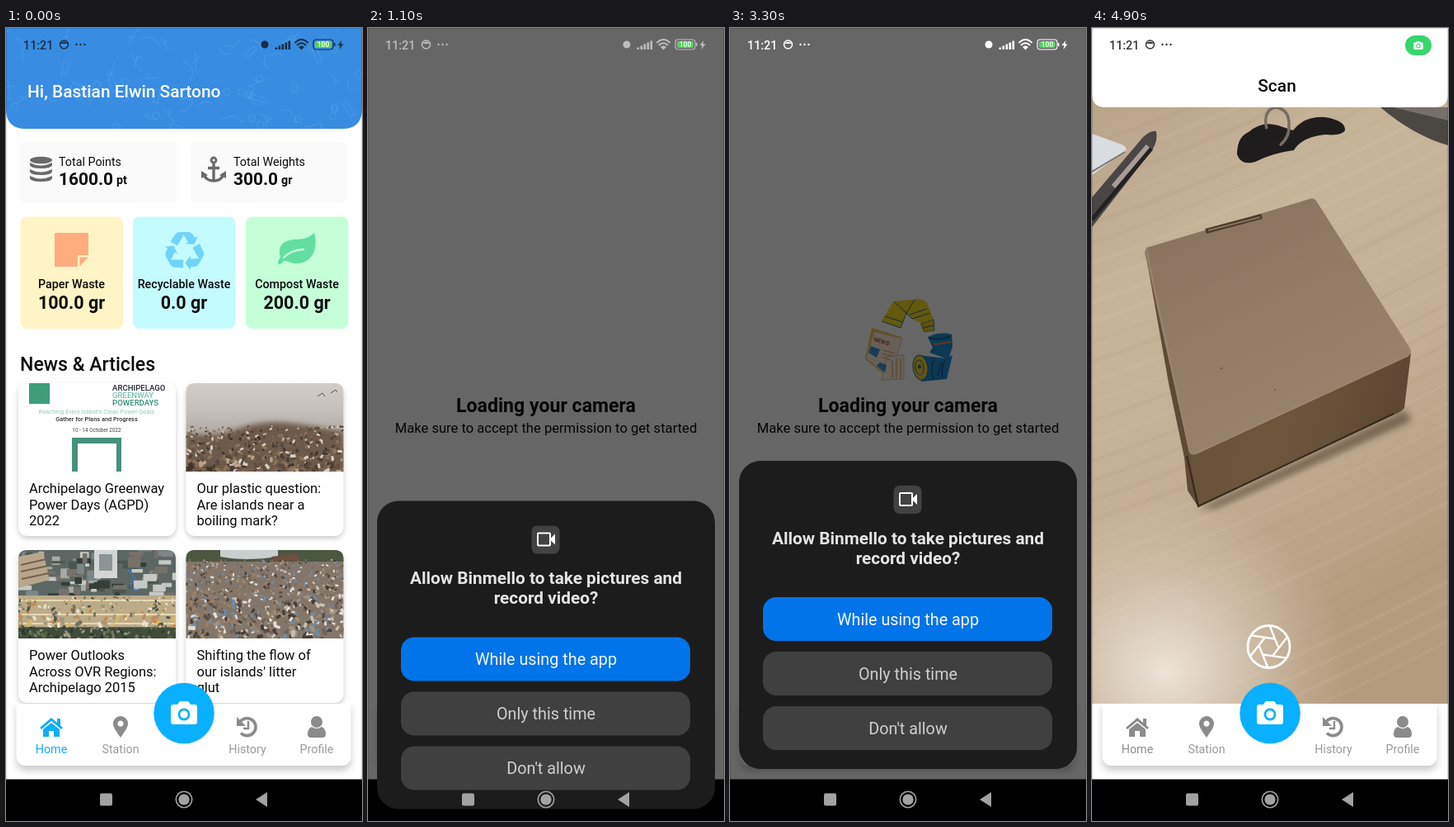
Write an HTML page that moves like this. It is 432 by 960 pixels and loops after 5000 ms.

```html
<!DOCTYPE html>
<html lang="en">
<head>
<meta charset="utf-8">
<title>Waste app</title>
<style>
html, body { margin: 0; width: 100%; height: 100%; overflow: hidden; background: #fff; }
svg { display: block; width: 432px; height: 960px; font-family: Roboto, sans-serif; }
.b { font-weight: 700; }
.m { font-weight: 500; }
.c { text-anchor: middle; }
.card { fill: #fff; filter: drop-shadow(0 3px 3px rgba(0,0,0,.2)); }
</style>
</head>
<body>
<svg id="stage" viewBox="0 0 432 960"></svg>
<script>
const LOOP = 5000, STEP = 100;

let seed = 7;
const rnd = () => (seed = (seed * 16807) % 2147483647) / 2147483647;
const pick = list => list[Math.floor(rnd() * list.length)];
const clamp = v => Math.max(0, Math.min(1, v));
const ramp = (t, a, b) => clamp((t - a) / (b - a));

const text = (x, y, size, str, cls = '', fill = '#0b0b0b') =>
  `<text x="${x}" y="${y}" font-size="${size}" class="${cls}" fill="${fill}">${str}</text>`;
const rect = (x, y, w, h, fill, r = 0, more = '') =>
  `<rect x="${x}" y="${y}" width="${w}" height="${h}" rx="${r}" fill="${fill}" ${more}/>`;
const path = (d, fill, more = '') => `<path d="${d}" fill="${fill}" ${more}/>`;
const line = (d, stroke, w = 1, more = '') =>
  `<path d="${d}" fill="none" stroke="${stroke}" stroke-width="${w}" ${more}/>`;
const circle = (x, y, r, fill, more = '') =>
  `<circle cx="${x}" cy="${y}" r="${r}" fill="${fill}" ${more}/>`;
const group = (id, body, more = '') => `<g id="${id}" ${more}>${body}</g>`;
const lines = (x, y, step, size, list) => list.map((s, i) => text(x, y + i * step, size, s)).join('');

// Scattered tilted chips, smaller towards the top
function litter(x, y, w, h, n, colors) {
  let out = '';
  for (let i = 0; i < n; i++) {
    const k = rnd(), px = x + rnd() * w, py = y + k * h, s = 1 + k * 3 * rnd() + rnd();
    out += rect((-s).toFixed(1), (-s / 2).toFixed(1), (s * 2).toFixed(1), (s * 1.1).toFixed(1), pick(colors), .8,
      `transform="translate(${px.toFixed(1)} ${py.toFixed(1)}) rotate(${Math.floor(rnd() * 180)})"`);
  }
  return out;
}

function doodles() {
  let out = '';
  for (let i = 0; i < 75; i++) {
    const x = rnd() * 432, y = rnd() * 122, a = rnd() * 360, s = 5 + rnd() * 8;
    const shape = pick([`M${-s} 0Q0 ${-s} ${s} 0`, `M${-s} -3H${s}V3H${-s}Z`,
      `M${-s} 0H${s}M0 0L${s / 2} 5`, `M0 ${-s / 2}a4 4 0 1 1 -1 0Z`]);
    out += line(shape, '#5fa8f0', 1.6, `opacity=".3" stroke-linecap="round" transform="translate(${x.toFixed(1)} ${y.toFixed(1)}) rotate(${a.toFixed(0)})"`);
  }
  return out;
}

const cameraGlyph = (x, y, k, bg, fill = '#fff') =>
  `<g transform="translate(${x} ${y}) scale(${k})">` +
  path('M-13-10H-8L-6-13Q-5.5-14 -4-14H4Q5.5-14 6-13L8-10H13Q16-10 16-7V11Q16 14 13 14H-13Q-16 14-16 11V-7Q-16-10-13-10Z', fill) +
  circle(0, 2, 7.4, bg) + circle(0, 2, 4.7, fill) + '</g>';

const recycleArm = 'M-17-11.5L-10-21.5Q-9-23-6-23H5Q8-23 10-20.5L13-16L16.5-18L12-8L1-9L4.5-11L-1-19.5L-8.5-6.5Z';
const recycle = (x, y, fill) => [0, 120, 240].map(a =>
  path(recycleArm, fill, `transform="translate(${x} ${y}) rotate(${a})"`)).join('');

function stats() {
  const ink = '#6a6a6a';
  let out = rect(17, 139, 190, 72, '#fafafa', 4) + rect(224, 139, 190, 72, '#fafafa', 4);
  for (let i = 0; i < 3; i++) {
    const y = 163 + i * 8;
    out += path(`M29 ${y}Q42 ${y + 7} 56 ${y}V${y + 3}Q55 ${y + 7} 42.5 ${y + 7}T29 ${y + 3}Z`, ink);
  }
  out += `<ellipse cx="42.5" cy="160" rx="13.5" ry="4.2" fill="${ink}"/>`;
  out += circle(252, 160, 3, 'none', `stroke="${ink}" stroke-width="2.8"`) +
    line('M252 163V185M245 169.500H259M240 177C242 183 246 185 252 185S262 183 264 177', ink, 3.4) +
    path('M237 182V173L245 178ZM267 182V173L259 178Z', ink);
  out += text(64, 167, 14.3, 'Total Points') + text(64, 190, 20.9, '1600.0', 'b') + text(134, 189, 14.3, 'pt', 'b');
  out += text(276, 167, 14.3, 'Total Weights') + text(276, 190, 20.9, '300.0', 'b') + text(334, 189, 14.3, 'gr', 'b');
  return out;
}

function wastes() {
  const tile = (x, fill, name, value) => rect(x, 228.500, 124.5, 135.500, fill, 8) +
    text(x + 62, 315, 14.3, name, 'm c') + text(x + 62, 340, 21.5, value, 'b c');
  return tile(17.5, '#fff4c5', 'Paper Waste', '100.0 gr') +
    tile(154, '#c4fbff', 'Recyclable Waste', '0.0 gr') +
    tile(291, '#c5ffd8', 'Compost Waste', '200.0 gr') +
    path('M60 248H99Q100 248 100 249V275H89Q87 275 87 277V289H60Q59 289 59 288V249Q59 248 60 248Z', '#ffad7e') +
    path('M89.500 277.500H100L89.500 288.500Z', '#ffad7e') +
    recycle(216.500, 270, '#70d4fa') +
    path('M374 248C379 266 373 284 354 285C346 286 341 281 337 282C335 284 333 287 331 286C328 284 332 280 333 277C328 262 340 256 352 256C362 256 369 253 374 248Z', '#62dea0') +
    line('M337 278C344 271 350 269 361 268', '#c5ffd8', 2.4, 'stroke-linecap="round"');
}

const clip = (id, x, y) => `<clipPath id="${id}"><path d="M${x} ${y + 107}V${y + 11}q0-11 11-11h169q11 0 11 11v96Z"/></clipPath>`;

function poster() {
  return rect(15, 430, 191, 107, '#fff') + rect(28, 430, 25, 25, '#3f9d7c') +
    text(129, 439, 9.6, 'ARCHIPELAGO', 'm', '#223') + text(129, 448, 9.6, 'GREENWAY', '', '#4bb497') +
    text(129, 457, 9.6, 'POWERDAYS', 'm', '#2f8f74') +
    text(110, 467, 7.4, "Reaching Every Island's Clean Power Goals", 'c', '#8fcbb8') +
    text(110, 476, 7.4, 'Gather for Plans and Progress', 'm c', '#333') +
    text(110, 489, 6.4, '10 - 14 October 2022', 'c', '#444') +
    rect(80, 496, 60, 42, '#46917c') + rect(87, 503, 47, 34, '#fff');
}

function bay() {
  return rect(218, 430, 192, 107, 'url(#water)') +
    path('M218 491Q250 497 280 486T340 478T410 489V537H218Z', '#6d5a4a', 'style="filter:blur(3px)"') +
    litter(218, 482, 192, 56, 420, ['#4e4035', '#7d6550', '#b9a48a', '#3d332c', '#d6cdbf', '#6a503f', '#8f7258', '#594a3e']) +
    path('M378 446l6-4 3 4M394 442l6-4 2 3', 'none', 'stroke="#555"');
}

function aerial() {
  let out = rect(15, 632, 191, 107, '#5c6764');
  for (let i = 0; i < 90; i++) {
    out += rect((12 + rnd() * 190).toFixed(1), (630 + rnd() * 56).toFixed(1), (4 + rnd() * 14).toFixed(1), (3 + rnd() * 10).toFixed(1),
      pick(['#7b8786', '#a4aaa6', '#343f3a', '#4a574f', '#c5c8c4', '#77716a']), 1);
  }
  out += rect(107, 632, 28, 34, '#d3d6d5') + rect(113, 637, 16, 20, '#8c9496');
  out += path('M15 640L45 634L53 668L15 678Z', '#b7a68b') + line('M18 650L49 643M18 658L51 651M19 667L52 660', '#765f50', 2);
  out += rect(15, 687, 191, 38, '#bcab88') + line('M15 693H206M15 710H206M15 721H206', '#e6d8b2', 2);
  out += litter(15, 688, 191, 37, 170, ['#d8b76a', '#76725f', '#c98a50', '#e9e2cc', '#4d5444', '#a3977c']);
  return out + rect(15, 726, 191, 13, '#3f4d3a') + litter(15, 724, 191, 16, 90, ['#58694a', '#7b7868', '#2d3a2d', '#a09a88']) +
    line('M148 656l8 10l-6 8l9 8', '#3d7de0', 2, 'stroke-dasharray="2 2"');
}

function river() {
  return rect(218, 632, 192, 107, '#83766a') + rect(218, 632, 192, 14, '#4c5742') +
    path('M260 632H330V640Q290 646 260 640Z', '#c8cfce') + path('M322 640L352 636L358 645H325Z', '#6d4f3f') +
    litter(218, 644, 192, 95, 750, ['#5a4d43', '#a0917f', '#c9c1b6', '#473d36', '#8c7462', '#e2ded7', '#6f6357', '#6f8ca3', '#9c8062']);
}

function news() {
  const spots = [[15, 430], [218.500, 430], [15, 632], [218.500, 632]];
  const shots = [poster, bay, aerial, river];
  const titles = [
    ['Archipelago Greenway', 'Power Days (AGPD)', '2022'],
    ['Our plastic question:', 'Are islands near a', 'boiling mark?'],
    ['Power Outlooks', 'Across OVR Regions:', 'Archipelago 2015'],
    ['Shifting the flow of', "our islands' litter", 'glut']];
  return spots.map(([x, y], i) => rect(x, y, 191, 185, '#fff', 11, 'class="card"') + clip('k' + i, x, y) +
    `<g clip-path="url(#k${i})">${shots[i]()}</g>` +
    lines(x + 13, y + 133, 19.6, 16.5, titles[i])).join('');
}

const home = () => rect(0, 0, 432, 910, '#fff') +
  '<clipPath id="top"><path d="M0 0H432V98Q432 122 408 122H24Q0 122 0 98Z"/></clipPath>' +
  `<g clip-path="url(#top)">${rect(0, 0, 432, 122, '#388ce1')}${doodles()}</g>` +
  text(26, 84, 20.9, 'Hi, Bastian Elwin Sartono', 'm', '#fff') +
  stats() + wastes() + text(17, 415, 23.1, 'News &amp; Articles', 'm') + news();

function emblem() {
  const ink = '#2f6f9a';
  const paper = path('M172 363L208 374L193 424L164 401Z', '#f6d33c') +
    path('M175 367L209 376L194 423L165 400Z', '#fff0dc', 'stroke="#d9b79a" stroke-width=".8"') +
    path('M190 398L211 396V425L184 426Z', '#fff3e2', 'stroke="#d9b79a" stroke-width=".8"') +
    `<text x="174" y="379" font-size="7" class="b" fill="#b4552f" transform="rotate(16 174 379)">NEWS</text>` +
    path('M171 385L182 389L178 399L168 393Z', '#3b97d3') + path('M182 405L190 408L188 417L178 409Z', '#3b97d3') +
    line('M186 390L200 394M185 394L199 398M184 398L195 402M197 402V424M202 400V424M207 400V424', '#e0a24d', 1);
  const rest = path('M184 355L196 334Q199 330 206 330L229 328Q238 329 240 335L248 356L247 367L234 367L231 357L221 352L214 345L207 363Z', '#f5df22') +
    line('M184 355L207 363L214 345L221 352M199 331L214 345L224 329M188 349L210 356M218 347L239 340M221 352L243 345', ink, 1) +
    path('M232 358L247 353L248 366L236 368Z', '#f0cf25', `stroke="${ink}" stroke-width=".7"`) + line('M234 363L247 360', ink, 1) +
    path('M240 374Q254 367 269 371L270 386L265 401L242 393L246 387Z', '#1f8fd2') +
    line('M241 375Q254 379 268 373', '#12547f', 1.5) + line('M247 383L268 380', '#d98a67', 2.5) +
    path('M229 396L262 400L270 396L263 425L232 428Z', '#1f8fd2') +
    `<ellipse cx="231" cy="411" rx="9" ry="15" fill="#f4d934" stroke="${ink}" transform="rotate(-8 231 411)"/>` +
    `<ellipse cx="230" cy="411" rx="5" ry="9" fill="none" stroke="${ink}" transform="rotate(-8 230 411)"/>` +
    circle(230, 410, 2.2, ink) + line('M247 402Q243 414 247 426M252 420L257 404M261 402Q256 412 258 424', '#12547f', 1.2);
  return group('emblem', group('paper', paper) + rest);
}

const loading = () => rect(0, 0, 432, 910, '#fff') + emblem() +
  text(216, 465, 23.1, 'Loading your camera', 'b c') +
  text(216, 489.500, 16.6, 'Make sure to accept the permission to get started', 'c');

function aperture(x, y) {
  let out = circle(x, y, 25.500, 'none', 'stroke="#fff" stroke-width="2.8"');
  for (let a = 0; a < 360; a += 60)
    out += line('M6-10.500H-23', '#fff', 2.4, `transform="translate(${x} ${y}) rotate(${a + 8})"`);
  return out;
}

function desk() {
  let grain = '';
  for (let i = 0; i < 34; i++) {
    const y = 100 + i * 24;
    grain += line(`M0 ${y + 40}Q180 ${y - 20} 432 ${y - 150}`, pick(['#a98d6b', '#e0cfb2']), 2 + rnd() * 4, 'opacity=".1"');
  }
  return rect(0, 60, 432, 760, 'url(#wood)') + grain +
    rect(0, 480, 360, 340, 'url(#glare)') +
    path('M350 96H432V142Q390 130 350 96Z', '#4b4743') + path('M365 96H432V112Z', '#77706a') +
    path('M0 128L36 141Q45 145 39 150L0 178Z', '#d9dce0') + line('M0 174L40 150', '#777', 2) +
    path('M0 205L62 132Q72 123 78 125Q80 136 74 146L0 241Z', '#4a4645') + line('M26 192L68 143', '#a79c97', 6) +
    line('M0 232L72 146', '#242122', 5) +
    path('M176 153Q176 132 190 126Q206 112 226 118L244 124Q258 106 283 108Q308 112 307 124Q303 131 283 129Q254 132 245 148Q220 151 198 162Q181 167 176 153Z', '#1f1c1d') +
    line('M212 122Q207 100 222 96Q240 98 239 118Q240 132 228 142', '#786c62', 3.4) +
    path('M129 582L380 462L388 476L150 582Z', '#4b3a2a', 'opacity=".6" style="filter:blur(4px)"') +
    path('M64 267L120 515L129 580L116 560L112 520L93 430Z', '#5f4a36') +
    path('M118 515L387 394L379 460Q374 466 364 469L129 580Z', 'url(#front)') +
    path('M66 266L264 207Q269 205 272 209L386 388Q389 394 383 398L126 516Q119 517 117 509L64 272Z', 'url(#lid)') +
    line('M66 268L118 512Q120 518 127 515L384 396', '#a08970', 1.2) +
    line('M138 246L206 228', '#4b392b', 6) + line('M141 245L204 229', '#88705a', 2) +
    line('M115 518L129 579L366 467', '#35281c', 2) +
    circle(157, 412, 1.2, '#6d5744') + circle(222, 438, 1, '#6d5744');
}

const scan = () => desk() + aperture(214.500, 749) +
  path('M0 0H432V80Q432 96 416 96H16Q0 96 0 80Z', '#fff') + text(224.500, 77, 20.9, 'Scan', 'm c');

function tabs() {
  const grey = '#8b8b8b';
  const label = (x, s) => text(x, 878, 14.3, s, 'c', '#9b9b9b');
  return rect(0, 818, 432, 92, '#fff') +
    '<clipPath id="low"><rect x="0" y="818" width="432" height="92"/></clipPath>' +
    `<g clip-path="url(#low)">${rect(12.500, 812, 406, 81, '#fff', 11, 'style="filter:drop-shadow(0 6px 4px rgba(0,0,0,.2))"')}</g>` +
    group('homeTab', path('M41 847L55 835L69 847L67 849L55 839L43 849ZM62 836H66V845L62 841ZM45 849L55 841L65 849V858H58V851H52V858H45Z', 'currentColor') +
      text(55, 878, 14.3, 'Home', 'c', 'currentColor')) +
    path('M139 833a9 9 0 0 1 9 9c0 5-5 11-9 17c-4-6-9-12-9-17a9 9 0 0 1 9-9zm0 5.500a3.600 3.600 0 1 0 .01 0z', grey, 'fill-rule="evenodd"') +
    line('M284 840A10.500 10.500 0 1 1 285 853.500', grey, 3.6) + path('M280 834V845H291Z', grey) + line('M294 839V848H288', grey, 2.4) +
    circle(377, 840, 7, grey) + path('M371 846Q377 850 383 846Q388 848 388 855Q388 859 384 859H370Q366 859 366 855Q366 848 371 846Z', grey) +
    label(139, 'Station') + label(293, 'History') + label(377, 'Profile') +
    circle(216, 829.500, 36.700, '#08b0ff', 'style="filter:drop-shadow(1px 1px 1px rgba(0,0,0,.12))"') + cameraGlyph(216, 829, 1, '#08b0ff');
}

function dialog() {
  const button = (y, s, fill, ink) => rect(40, y, 351, 53, fill, 16) + text(216, y + 34, 19.8, s, 'c', ink);
  return rect(11, 524, 410, 373, '#1c1c1c', 26) + rect(198.500, 554, 34, 34, '#424242', 7) +
    rect(206, 563, 15, 15, 'none', 1, 'stroke="#fff" stroke-width="2"') + path('M222 569L227 564V577L222 572Z', '#fff') +
    text(216, 625, 20.8, 'Allow Binmello to take pictures and', 'b c', '#e4e4e4') + text(216, 649, 20.8, 'record video?', 'b c', '#e4e4e4') +
    button(689, 'While using the app', '#0074e8', '#f2f6ff') + button(755, 'Only this time', '#404040', '#cfcfcf') +
    button(821, "Don't allow", '#404040', '#cfcfcf');
}

function status() {
  const ink = 'currentColor';
  let bars = '';
  for (let i = 0; i < 5; i++) bars += rect(326.500 + i * 4, 23.500 - i * 2, 2.6, 2.500 + i * 2, ink, .5);
  const left = group('clock', text(21, 26, 14.3, '11:21', 'm', ink) +
    circle(70.500, 20, 5, 'none', `stroke="${ink}" stroke-width="1.5"`) + path('M66 19Q70.500 14 75 19Z', ink) +
    [85.500, 90.500, 95.500].map(x => circle(x, 20, 1.2, ink)).join(''));
  const right = group('signals', circle(314, 20, 4.500, ink) + bars +
    line('M350.500 18Q358.500 10 366.500 18M353 21Q358.500 15.500 364 21', ink, 2) + path('M355 23Q358.500 20 362 23L358.500 26.500Z', ink) +
    rect(373, 14, 24, 12, 'none', 3.500, `stroke="${ink}" stroke-width="1.2"`) + rect(398, 18, 1.500, 4, ink) +
    rect(375, 16, 20, 8, '#55cf5f', 1.500) + text(385, 23.200, 8.500, '100', 'b c', '#e9ffe4') +
    path('M407.500 15L402.500 21H405.500L404.500 26L409.500 19.500H406.500Z', ink));
  return left + right + group('chip', rect(380, 9, 32, 24, '#36d66c', 12) + cameraGlyph(396, 21, .36, '#36d66c'));
}

const keys = () => rect(114, 926.500, 15, 15, '#a2a2a2', 2) +
  circle(216, 934, 9.700, 'none', 'stroke="#a2a2a2" stroke-width="1.6"') + circle(216, 934, 6.600, '#a2a2a2') +
  path('M303 934L317 925V943Z', '#a2a2a2');

const grad = (id, x2, y2, stops) => `<linearGradient id="${id}" x1="0" y1="0" x2="${x2}" y2="${y2}">` +
  stops.map((c, i) => `<stop offset="${i / (stops.length - 1)}" stop-color="${c}"/>`).join('') + '</linearGradient>';

const stage = document.getElementById('stage');
stage.innerHTML = '<defs>' +
  grad('water', 0, 1, ['#d3cdc7', '#c3beb9', '#a5a09a', '#74665a']) +
  grad('wood', .4, 1, ['#b7a288', '#c6b499', '#c3af94', '#b39b7d']) +
  grad('lid', .5, 1, ['#87705b', '#937c66', '#99836c']) +
  grad('front', 1, .2, ['#68513a', '#6e563c', '#5d4732']) +
  '<radialGradient id="glare" cx=".25" cy=".88" r=".62"><stop offset="0" stop-color="#f6f1e8" stop-opacity=".85"/>' +
  '<stop offset=".4" stop-color="#e6dccd" stop-opacity=".6"/><stop offset="1" stop-color="#d8c8b0" stop-opacity="0"/></radialGradient></defs>' +
  group('home', home()) + group('loading', loading()) + group('scan', scan()) + group('tabs', tabs()) +
  rect(.5, .5, 431, 910, 'none', 0, 'stroke="#000" stroke-opacity=".13"') +
  group('dim', rect(0, 0, 432, 910, '#000')) + rect(0, 909.500, 432, 51, '#000') +
  group('dialog', dialog()) + group('status', status()) + keys();

const el = {};
stage.querySelectorAll('g[id]').forEach(g => el[g.id] = g);
const show = (id, on) => { el[id].style.display = on ? '' : 'none'; };

function draw(t) {
  const atHome = t < 800, atScan = t >= 4400;
  const out = ramp(t, 3900, 4100);
  const shade = ramp(t, 900, 1100) * (1 - out);
  const rest = 1 - ramp(t, 900, 1200);
  const slide = 436 * (rest * rest + out * out);

  show('home', atHome);
  show('loading', !atHome && !atScan);
  show('scan', atScan);
  el.homeTab.style.color = atHome ? '#12aef2' : '#8b8b8b';
  el.emblem.style.opacity = ramp(t, 1200, 1500);
  el.paper.style.opacity = .55 + .45 * ramp(t, 1900, 2500);

  el.dim.style.opacity = .6 * shade;
  show('dialog', slide < 436 && !atHome);
  el.dialog.setAttribute('transform', `translate(0 ${slide.toFixed(2)})`);

  el.status.style.color = atHome ? '#1b2c42' : atScan ? '#333' : t >= 1000 && t < 1200 ? '#bdbdbd' : '#fff';
  show('signals', !atScan);
  show('chip', atScan);
}

const start = performance.now();
function tick() {
  const t = (performance.now() - start) % LOOP;
  draw(Math.floor(t / STEP) * STEP);
  requestAnimationFrame(tick);
}
tick();
</script>
</body>
</html>
```
